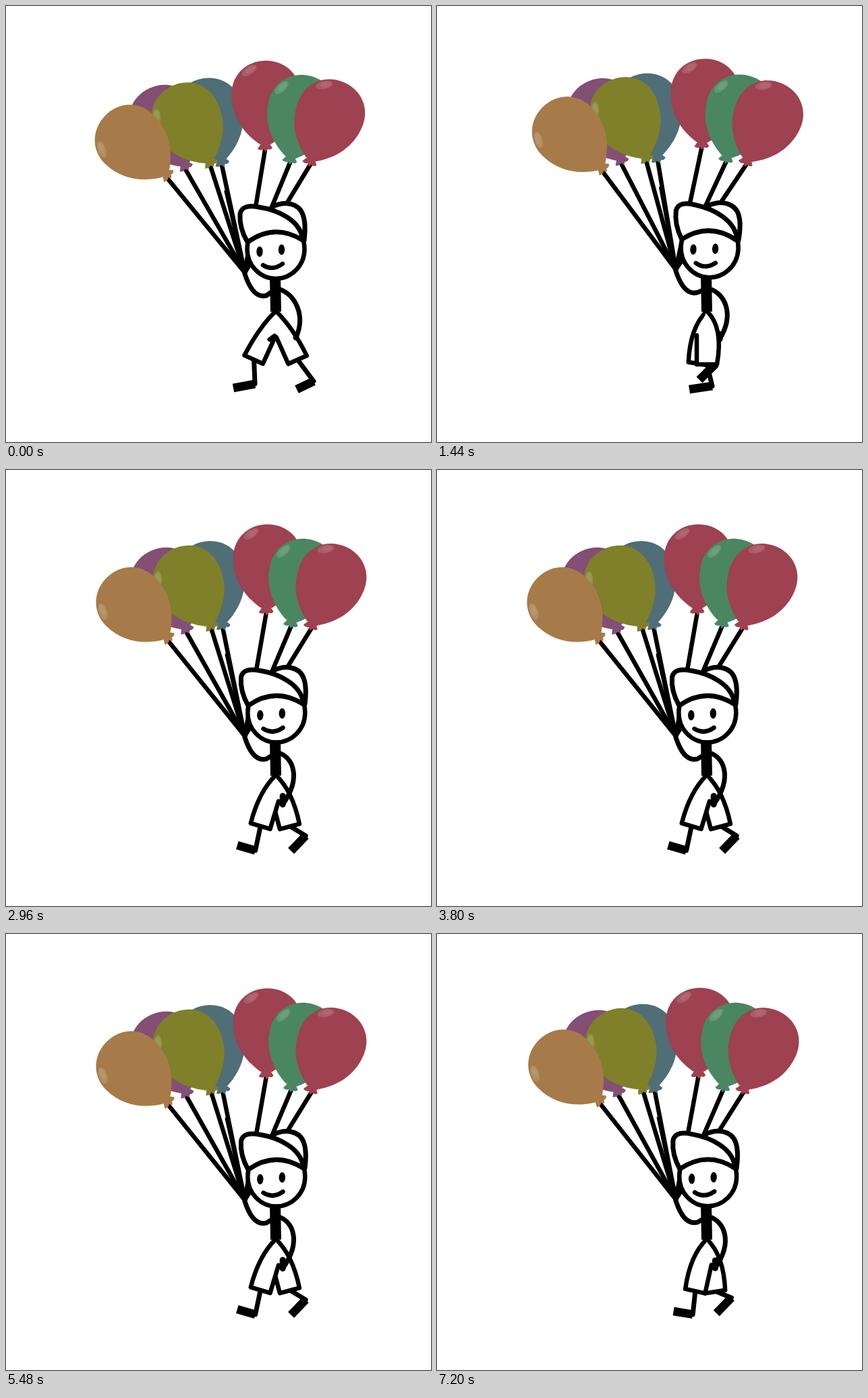
Write an HTML page with a canvas that moves like this. It is 630 px wide and 646 px high and loops after 7240 ms.

```html
<!DOCTYPE html>
<html>
<head>
<meta charset="utf-8">
<style>
html, body { margin: 0; width: 100%; height: 100%; overflow: hidden; background: #fff; }
canvas { display: block; }
</style>
</head>
<body>
<canvas id="stage" width="630" height="646"></canvas>
<script>
const ctx = document.getElementById('stage').getContext('2d');
const HAND = [354, 395], HIP = [400, 452], NECK = [399, 404];
const RED = '#9e4150';

// knot x, y, tilt, colour, direction of the highlight
const balloons = [
  [320, 231, -15.5, '#4f6e77'],
  [266, 237, -25, '#834f74'],
  [303, 232, -28, '#7f8029', -90],
  [239, 250, -47, '#a67b49', -109],
  [384, 208, 1, RED, -34],
  [421, 227, 13.5, '#4a8662', -43],
  [451, 230, 23, RED, -12]
];
const bodyShape = new Path2D('M-8-3C-34-20-51-45-51-77C-51-106-29-127 0-127C29-127 51-106 51-77C51-45 34-20 8-3Z');
const knotShape = new Path2D('M-5-6L-11 4Q-6 7-2 4L1 8L4 4Q8 6 11 2L5-6Z');

// key poses of each leg: thigh angle, ankle x, y, toe x, y
const farLeg = [
  [-24.6, 369, 560, 337, 566], [0, 408, 563, 374, 568], [21, 452, 545, 431, 567],
  [-9, 413, 530, 389, 554], [-24.6, 369, 560, 337, 566]
];
const nearLeg = [
  [24, 456, 556, 431, 568], [-9, 413, 530, 389, 554], [-21, 360, 564, 335, 553],
  [0, 408, 563, 374, 568], [24, 456, 556, 431, 568]
];

const rad = d => d * Math.PI / 180;
const mix = (a, b, k) => a + (b - a) * k;

function pose(keys, p) {
  const i = Math.min(3, Math.floor(p / 5));
  return keys[i].map((v, j) => mix(v, keys[i + 1][j], p / 5 - i));
}

function line(x1, y1, x2, y2, width = 7, cap = 'round') {
  ctx.lineCap = cap;
  ctx.lineWidth = width;
  ctx.beginPath();
  ctx.moveTo(x1, y1);
  ctx.lineTo(x2, y2);
  ctx.stroke();
}

function curve(d, fill, width = 7) {
  const path = new Path2D(d);
  ctx.lineCap = 'round';
  ctx.lineWidth = width;
  if (fill) {
    ctx.fillStyle = fill;
    ctx.fill(path);
  }
  ctx.stroke(path);
}

function oval(x, y, rx, ry, color, turn = 0) {
  ctx.fillStyle = color;
  ctx.beginPath();
  ctx.ellipse(x, y, rx, ry, turn, 0, 7);
  ctx.fill();
}

// draw inside a frame turned about a point and shifted
function turned([x, y], angle, dx, dy, draw) {
  ctx.save();
  ctx.translate(x + dx, y + dy);
  ctx.rotate(angle);
  ctx.translate(-x, -y);
  draw();
  ctx.restore();
}

function drawBalloons() {
  for (const [x, y] of balloons) line(x, y + 5, ...HAND, 6.5);
  line(326, 275, ...HAND, 5);
  for (const [x, y, tilt, color, shine] of balloons) {
    const a = rad(tilt);
    ctx.save();
    ctx.translate(x, y);
    ctx.rotate(a);
    ctx.fillStyle = color;
    ctx.fill(bodyShape);
    ctx.fill(knotShape);
    ctx.restore();
    if (shine === undefined) continue;
    const s = rad(shine);
    const hx = x + 76 * Math.sin(a) + 44 * Math.sin(s);
    const hy = y - 76 * Math.cos(a) - 44 * Math.cos(s);
    oval(hx, hy, 12.5, 6, 'rgba(255,255,255,.14)', s);
    oval(hx + 2 * Math.cos(s), hy + 2 * Math.sin(s), 8, 4, 'rgba(255,255,255,.07)', s);
  }
}

function drawHead() {
  curve('M394 298C413 288 434 292 440 309Q445 322 442 347L390 330Z', '#fff');
  ctx.beginPath();
  ctx.ellipse(400, 360, 42.5, 44, 0, 0, 7);
  ctx.fillStyle = '#fff';
  ctx.fill();
  ctx.lineWidth = 6.5;
  ctx.stroke();
  curve('M358 350C351 338 346 322 347 308C349 297 360 295 375 298C402 302 437 317 440 347Q398 321 358 350Z', '#fff');
  oval(376, 364, 4.7, 7.7, '#000');
  oval(408.5, 361, 4.7, 7.7, '#000');
  curve('M381 384Q395 393 410 382', null, 6.5);
}

// side: -1 when the trouser leg's outer seam faces left, 1 when right
function drawLeg([thigh, ax, ay, tx, ty], side) {
  const sin = Math.sin(rad(thigh)), cos = Math.cos(rad(thigh));
  const at = (across, down) => [
    HIP[0] + side * across * cos + down * sin,
    HIP[1] - side * across * sin + down * cos
  ];
  line(...at(0, 78), ax, ay);
  line(ax, ay, tx, ty, 12.5, 'butt');
  curve(`M${HIP}Q${HIP[0] + side * 25} ${HIP[1] + 24} ${at(15, 79)}L${at(-15, 79)}L${at(-15, 36)}`, '#fff', 6.5);
}

function drawArms(k, lift) {
  curve(`M354 ${397 - lift}Q366 ${434 - lift} 386 ${429 - lift}L402 418`);
  const hx = mix(430, 408, k), hy = mix(491, 496, k);
  curve(`M404 419C${mix(430, 422, k)} ${mix(428, 424, k)} ${mix(444, 440, k)} ${mix(459, 452, k)} ${hx} ${hy}`);
  line(hx, hy - 14 * k, hx, hy, 9);
}

function draw(p) {
  const sway = p < 10 ? (5 - Math.abs(p - 5)) * 0.82 : 5 - Math.abs(p - 15);
  const far = pose(farLeg, p), near = pose(nearLeg, p);
  const side = far[0] < near[0] ? -1 : 1;
  ctx.fillStyle = '#fff';
  ctx.fillRect(0, 0, 630, 646);
  ctx.strokeStyle = '#000';
  ctx.lineJoin = 'round';
  turned(HAND, sway * 0.0092, 0, -0.9 * sway, drawBalloons);
  turned(NECK, sway * 0.012, 0.3 * sway, -0.4 * sway, drawHead);
  drawLeg(far, side);
  drawLeg(near, -side);
  if (near[0] - far[0] > 38) line(391, 494, 398, 489);
  line(399, 401, 400, 453, 16, 'butt');
  drawArms(1 - Math.abs(p - 10) / 10, 0.9 * sway);
}

function tick() {
  const step = Math.floor(performance.now() / 40) % 181;
  draw(step % 21);
  requestAnimationFrame(tick);
}
tick();
</script>
</body>
</html>
```
